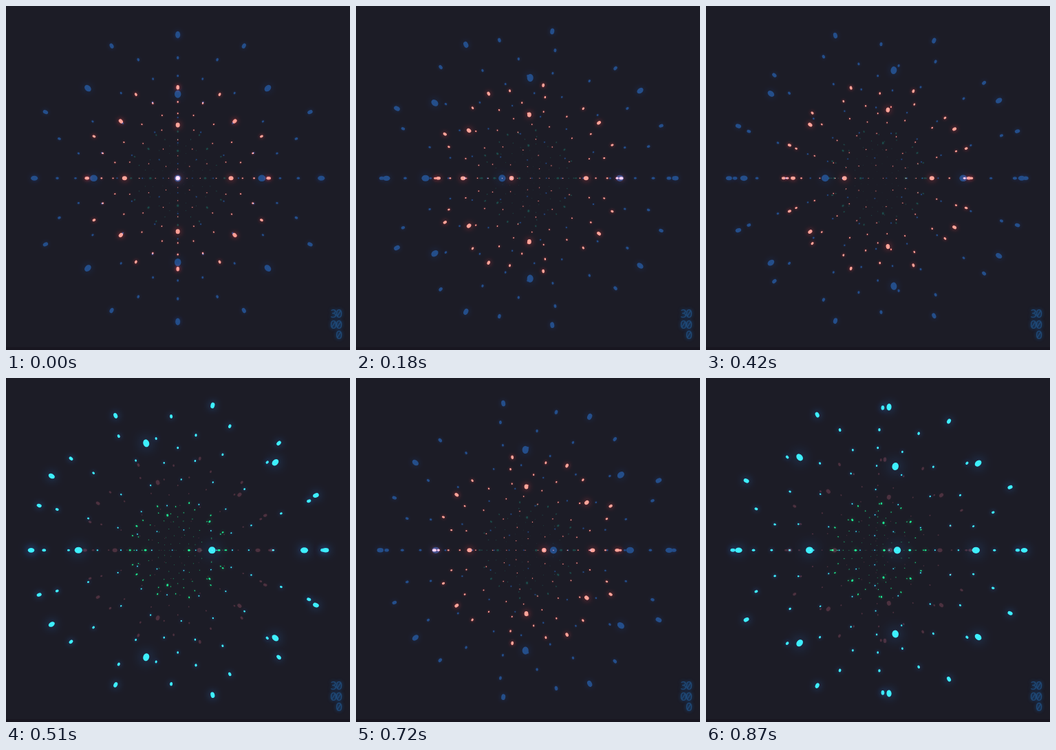
An HTML page with a canvas for the animation above (900 ms loop, 500 by 500 pixels).

```html
<!DOCTYPE html>
<html lang="en">
<head>
<meta charset="utf-8">
<title>Nested dot spheres</title>
<style>
  html, body { margin: 0; width: 100%; height: 100%; overflow: hidden; background: #1c1c26; }
  canvas { position: absolute; left: 0; top: 0; }
  div {
    position: absolute; right: 13px; top: 439px;
    font: 17px/15.5px "Noto Sans Mono", monospace;
    letter-spacing: -2.2px; text-align: right; white-space: pre;
    color: #1f4a78; text-shadow: 0 0 5px #1b4f8c;
  }
</style>
</head>
<body>
<canvas id="stage" width="500" height="500"></canvas>
<div>30
00
0</div>
<script>
const SIZE = 500, CX = 249.7, CY = 250.3;
const LOOP = 900, STEP = 30;
const DETAIL = 5;        // subdivisions of each octahedron edge
const DEPTH = 0.7265;    // sphere radius / camera distance
const FOCAL = 204.7;
const DOT = 1.4;         // dot radius at the centre's depth

const layers = [
  { scale: 1,
    on:  { core: 'rgb(34,212,222)', glow: 'rgba(20,100,190,.85)', blur: 4 },
    off: { core: 'rgb(8,50,100)', glow: 'rgba(6,40,95,.6)', blur: 2.5 } },
  { scale: 0.633,
    on:  { core: 'rgb(240,137,116)', glow: 'rgba(225,45,40,.8)', blur: 3 },
    off: { core: 'rgb(48,21,25)', glow: 'rgba(40,12,16,.4)', blur: 2 } },
  { scale: 0.326,
    on:  { core: 'rgb(0,215,110)', glow: 'rgba(0,130,70,.8)', blur: 4 },
    off: { core: 'rgb(0,46,36)', glow: 'rgba(0,40,30,.5)', blur: 3 } }
];

// Octahedron surface grid pushed out onto the unit sphere
const points = [];
for (let x = -DETAIL; x <= DETAIL; x++) {
  const rest = DETAIL - Math.abs(x);
  for (let y = -rest; y <= rest; y++) {
    const z = rest - Math.abs(y), len = Math.hypot(x, y, z);
    for (const side of z ? [z, -z] : [0]) points.push([x / len, y / len, side / len]);
  }
}

const stage = document.getElementById('stage').getContext('2d');
const buffer = document.createElement('canvas');
buffer.width = buffer.height = SIZE;
const pen = buffer.getContext('2d');

function drawSphere(scale, style, turn) {
  const cos = Math.cos(turn), sin = Math.sin(turn);
  pen.clearRect(0, 0, SIZE, SIZE);
  pen.fillStyle = style.core;
  pen.shadowColor = style.glow;
  for (const [x, y, z] of points) {
    const near = 1 / (1 - DEPTH * (x * sin + z * cos));
    const px = FOCAL * DEPTH * (x * cos - z * sin) * near;
    const py = FOCAL * DEPTH * y * near;
    const radius = DOT * near * scale;
    const stretch = Math.hypot(1, Math.hypot(px, py) / FOCAL);
    pen.shadowBlur = radius * style.blur;
    pen.beginPath();
    pen.ellipse(CX + px * scale, CY + py * scale, radius * stretch, radius,
      Math.atan2(py, px), 0, 2 * Math.PI);
    pen.fill();
  }
}

function draw(step) {
  const turn = step * STEP / LOOP * Math.PI / 2;
  stage.globalCompositeOperation = 'source-over';
  stage.fillStyle = '#1c1c26';
  stage.fillRect(0, 0, SIZE, SIZE);
  stage.fillStyle = '#181620';
  stage.fillRect(0, 496, SIZE, 4);
  stage.globalCompositeOperation = 'lighter';
  layers.forEach((layer, i) => {
    // neighbouring spheres light up on alternate steps
    drawSphere(layer.scale, (i + step) % 2 ? layer.on : layer.off, turn);
    stage.drawImage(buffer, 0, 0);
  });
}

let shown = -1;
function tick(now) {
  const step = Math.floor(now % LOOP / STEP);
  if (step !== shown) draw(shown = step);
  requestAnimationFrame(tick);
}
draw(0);
requestAnimationFrame(tick);
</script>
</body>
</html>
```
